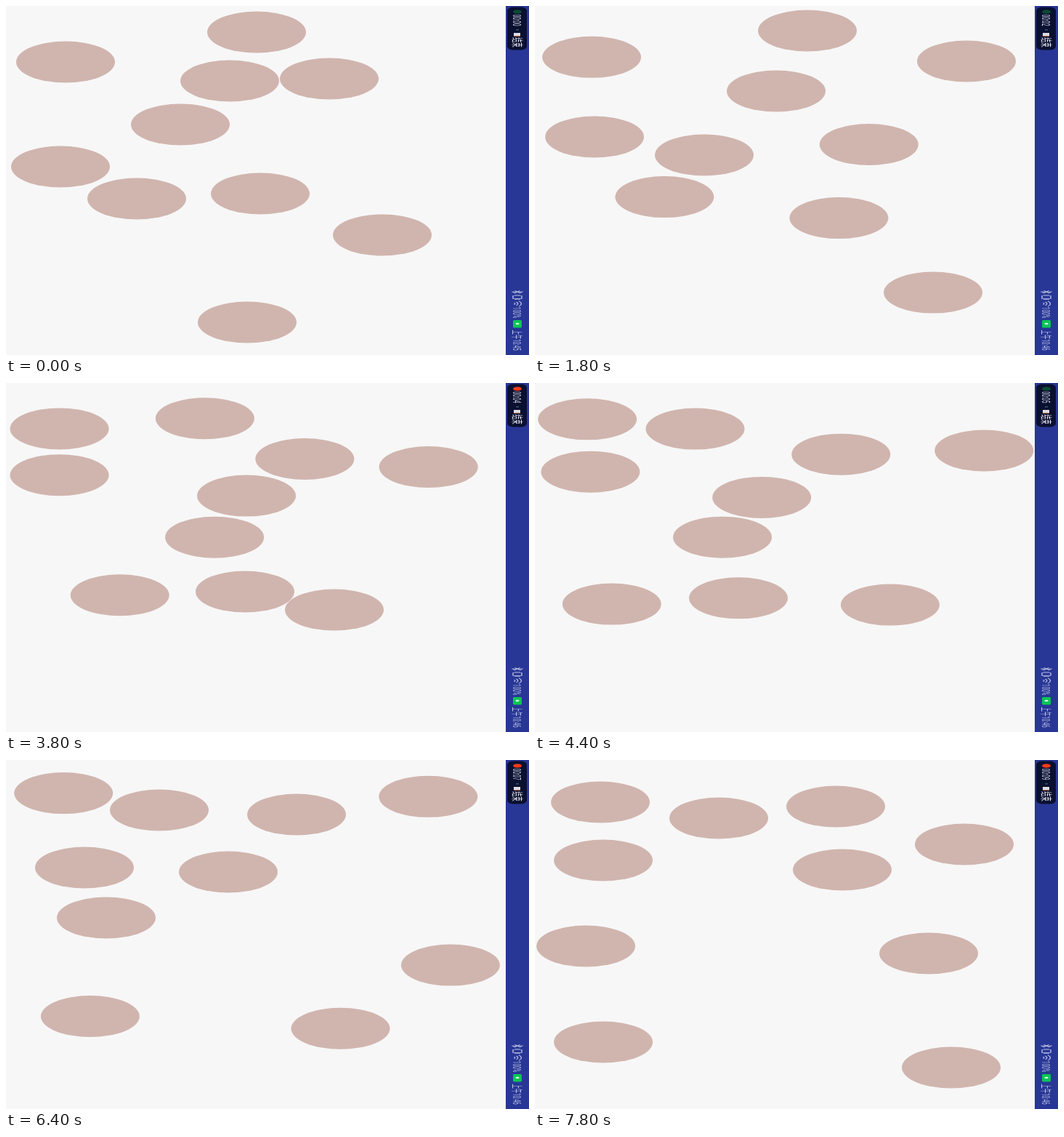
These frames come from a looping animation (720x480 px, 8000 ms). An HTML page:

```html
<!DOCTYPE html>
<html lang="zh">
<head>
<meta charset="utf-8">
<title>Bouncing balls</title>
<style>
html, body { margin: 0; width: 100%; height: 100%; overflow: hidden; background: #f7f7f7; }
svg { display: block; width: 100vw; height: 100vh; }
text { font: 15px Roboto, "Noto Sans CJK SC", "Noto Sans CJK", sans-serif; }
</style>
</head>
<body>
<svg viewBox="0 0 720 480">
  <rect width="720" height="480" fill="#f7f7f7"/>
  <g id="balls" fill="#d0b5ae"></g>
  <rect x="688" width="32" height="480" fill="#283796"/>
  <rect x="690" y="1.5" width="27" height="59" rx="8" ry="5" fill="#0a1030"/>
  <ellipse id="dot" cx="704" cy="8" rx="6" ry="2.8"/>
  <rect x="702" y="32" width="4" height="1.5" fill="#2c5a68"/>
  <rect x="699" y="37" width="9" height="4" fill="#dcdce4"/>
  <rect x="699" y="41" width="9" height="1" fill="#b0653c"/>
  <!-- sideways phone status bar, squeezed along its length -->
  <g transform="translate(704 0) rotate(90) scale(.42 1)" fill="#bcc1e4">
    <text id="timer" x="28" y="6" fill="#dcdeee"></text>
    <text x="103" y="6" fill="#e8e8f0" style="font-size:16px">结束</text>
    <g fill="none" stroke="#bcc1e4" stroke-width="1.4">
      <path d="M932 -3.5L940 3.5L936 7V-7L940 -3.5L932 3.5"/>
      <path d="M949 -6h9V6h-9zM946 -4V4M961 -4V4"/>
      <path d="M966 -2Q975 -9 984 -2M969 1.5Q975 -3 981 1.5M972 4.5Q975 2 978 4.5"/>
    </g>
    <text x="986" y="6">100%</text>
    <text id="clock" x="1061" y="6"></text>
  </g>
  <rect x="698" y="432" width="12" height="10.5" rx="1.5" fill="#0cc557"/>
  <ellipse cx="704" cy="437" rx="2.6" ry="1.3" fill="#d4f7df"/>
</svg>
<script>
const LOOP = 8000, STEP = 200, END = 7800;
const RX = 68, RY = 28.5, WIDTH = 688, HEIGHT = 480;
const $ = id => document.getElementById(id);
const balls = [];

// Balls run straight between hits [time, x, y]. Coordinates ignore the walls;
// fold() turns them into bounces.
function ball(from, to, ...hits) {
  const el = document.createElementNS("http://www.w3.org/2000/svg", "ellipse");
  el.setAttribute("rx", RX);
  el.setAttribute("ry", RY);
  $("balls").append(el);
  balls.push({ el, path: [[0, ...from], ...hits, [END, ...to]] });
}

ball([332, 435 + 33], [542, 266], [3800, 788, 312]);
ball([350, 258], [649, -59], [5200, 667, 63]);
ball([82, 77], [90, -1], [4050, 73, 62], [5200, 70, 22]);
ball([180, 265], [42, 388], [2200, 178, 262], [4080, 153, 297], [5115, 0, 320]);
ball([518, 315], [667, 423], [3000, 352, 276], [3800, 329, 287], [4080, 284, 285], [5115, 271, 320]);
ball([75, 221], [42, 138], [1800, 82, 180], [4050, 60, 120], [5200, 59, 127], [6400, 28, 148]);
ball([345, 36], [253, -23], [1800, 375, 34], [2720, 370, 34], [4900, 176, -18], [6400, 211, -12]);
ball([240, 163], [66, 256], [1800, 233, 205], [3000, 280, 222], [3900, 288, 211], [6400, 138, 217]);
ball([308, 103], [423, 151], [1800, 332, 117], [3900, 331, 157], [5200, 282, 158], [6400, 306, 154]);
ball([445, 100], [826, 64], [1800, 646, 76], [2720, 782, 77], [3900, 833, 107], [5200, 796, 84], [6400, 840, 75]);

// Mirror v back and forth between the walls at r and size - r.
function fold(v, r, size) {
  const span = size - 2 * r;
  const m = Math.abs(v - r) % (2 * span);
  return r + span - Math.abs(span - m);
}

function place(path, t) {
  const i = path.findIndex(p => p[0] > t);
  const [t1, x1, y1] = path.at(i), [t0, x0, y0] = path.at(i < 0 ? -2 : i - 1);
  const k = (t - t0) / (t1 - t0);
  return [fold(x0 + (x1 - x0) * k, RX, WIDTH), fold(y0 + (y1 - y0) * k, RY, HEIGHT)];
}

function draw(t) {
  for (const { el, path } of balls) {
    const [x, y] = place(path, t);
    el.setAttribute("cx", x);
    el.setAttribute("cy", y);
  }
  const blink = t % 2400;
  $("dot").setAttribute("fill", blink >= 500 && blink < 1700 ? "#f03a1c" : "#0c4a34");
  $("timer").textContent = "00:0" + Math.floor((t * 1.1 + 500) / 1000);
  $("clock").textContent = "上午10:" + (t < 1000 ? 45 : 46);
}

const start = performance.now();
function tick() {
  const t = (performance.now() - start) % LOOP;
  draw(Math.floor(t / STEP) * STEP);
  requestAnimationFrame(tick);
}
tick();
</script>
</body>
</html>
```
